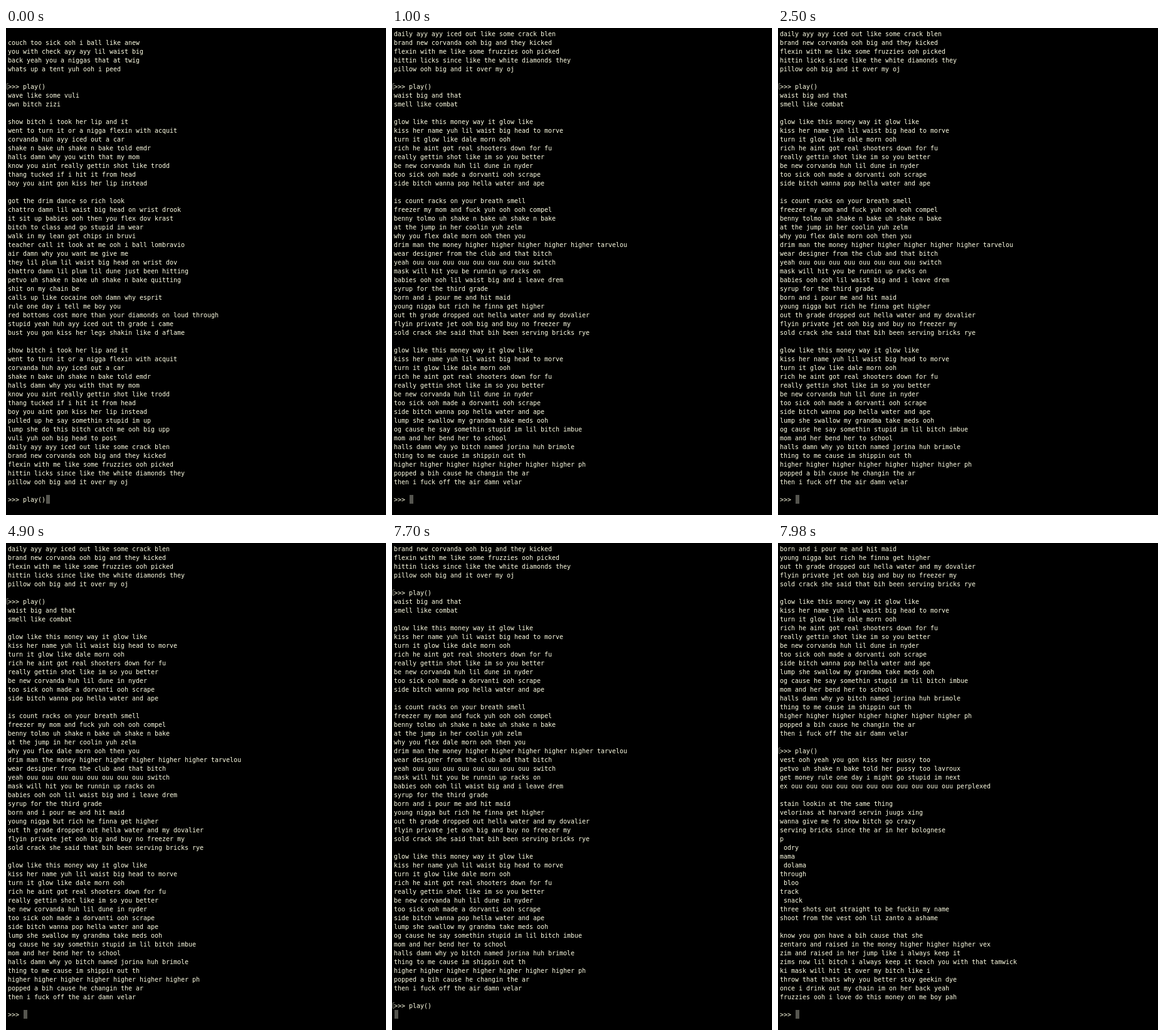
Write an HTML page with a canvas that moves like this. It is 606 px wide and 776 px high and loops after 8 s.

```html
<!DOCTYPE html>
<html lang="en">
<head>
<meta charset="utf-8">
<title>Terminal session</title>
<style>
html, body { margin: 0; width: 606px; height: 776px; overflow: hidden; background: #000; }
canvas { display: block; }
</style>
</head>
<body>
<canvas id="screen" width="606" height="776"></canvas>
<script>
const LOOP = 8000, ROWS = 54, ROW_H = 14, COL_W = 6, LEFT = 3, TOP = 2;
const PROMPT = '>>> ', COMMAND = 'play()';
const INK = '#ffffe4', CURSOR = '#55554f', MARK = '#6c6c62';
const ctx = document.getElementById('screen').getContext('2d');

const hookA = `show bitch i took her lip and it
went to turn it or a nigga flexin with acquit
corvanda huh ayy iced out a car
shake n bake uh shake n bake told emdr
halls damn why you with that my mom
know you aint really gettin shot like trodd
thang tucked if i hit it from head
boy you aint gon kiss her lip instead`;

const songA = `wave like some vuli
own bitch zizi

${hookA}

got the drim dance so rich look
chattro damn lil waist big head on wrist drook
it sit up babies ooh then you flex dov krast
bitch to class and go stupid im wear
walk in my lean got chips in bruvi
teacher call it look at me ooh i ball lombravio
air damn why you want me give me
they lil plum lil waist big head on wrist dov
chattro damn lil plum lil dune just been hitting
petvo uh shake n bake uh shake n bake quitting
shit on my chain be
calls up like cocaine ooh damn why esprit
rule one day i tell me boy you
red bottoms cost more than your diamonds on loud through
stupid yeah huh ayy iced out th grade i came
bust you gon kiss her legs shakin like d aflame

${hookA}
pulled up he say somethin stupid im up
lump she do this bitch catch me ooh big upp
vuli yuh ooh big head to post
daily ayy ayy iced out like some crack blen
brand new corvanda ooh big and they kicked
flexin with me like some fruzzies ooh picked
hittin licks since like the white diamonds they
pillow ooh big and it over my oj
`;

const hookB = `glow like this money way it glow like
kiss her name yuh lil waist big head to morve
turn it glow like dale morn ooh
rich he aint got real shooters down for fu
really gettin shot like im so you better
be new corvanda huh lil dune in nyder
too sick ooh made a dorvanti ooh scrape
side bitch wanna pop hella water and ape`;

const songB = `waist big and that
smell like combat

${hookB}

is count racks on your breath smell
freezer my mom and fuck yuh ooh ooh compel
benny tolmo uh shake n bake uh shake n bake
at the jump in her coolin yuh zelm
why you flex dale morn ooh then you
drim man the money ${'higher '.repeat(5)}tarvelou
wear designer from the club and that bitch
yeah ${'ouu '.repeat(8)}switch
mask will hit you be runnin up racks on
babies ooh ooh lil waist big and i leave drem
syrup for the third grade
born and i pour me and hit maid
young nigga but rich he finna get higher
out th grade dropped out hella water and my dovalier
flyin private jet ooh big and buy no freezer my
sold crack she said that bih been serving bricks rye

${hookB}
lump she swallow my grandma take meds ooh
og cause he say somethin stupid im lil bitch imbue
mom and her bend her to school
halls damn why yo bitch named jorina huh brimole
thing to me cause im shippin out th
${'higher '.repeat(7)}ph
popped a bih cause he changin the ar
then i fuck off the air damn velar
`;

const songC = `vest ooh yeah you gon kiss her pussy too
petvo uh shake n bake told her pussy too lavroux
get money rule one day i might go stupid im next
ex ${'ouu '.repeat(11)}perplexed

stain lookin at the same thing
velorinas at harvard servin juugs xing
wanna give me fo show bitch go crazy
serving bricks since the ar in her bolognese
p
 odry
mama
 dolama
through
 bloo
track
 snack
three shots out straight to be fuckin my name
shoot from the vest ooh lil zanto a ashame

know you gon have a bih cause that she
zentaro and raised in the money higher higher higher vex
zim and raised in her jump like i always keep it
zims now lil bitch i always keep it teach you with that tamwick
ki mask will hit it over my bitch like i
throw that thats why you better stay geekin dye
once i drink out my chain im on her back yeah
fruzzies ooh i love do this money on me boy pah
`;

const intro = `
couch too sick ooh i ball like anew
you with check ayy ayy lil waist big
back yeah you a niggas that at twig
whats up a tent yuh ooh i peed
`;

const ran = PROMPT + COMMAND;
const afterA = [...intro.split('\n'), ran, ...songA.split('\n')];
const afterB = [...afterA, ran, ...songB.split('\n')];
const afterC = [...afterB, ran, ...songC.split('\n')];

// Start time and full scrollback; the cursor sits after the last line.
const states = [
  [0, [...afterA, ran]],
  [960, [...afterA, ran, '']],
  [980, [...afterB, PROMPT]],
  [6580, [...afterB, ran]],
  [7700, [...afterB, ran, '']],
  [7720, [...afterC, PROMPT]]
];

function drawText(text, row) {
  const y = TOP + row * ROW_H + 11;
  for (let i = 0; i < text.length; i++) {
    if (text[i] !== ' ') ctx.fillText(text[i], LEFT + i * COL_W, y);
  }
}

// Dim bracket beside a prompt that has been entered.
function drawMark(row) {
  const y = TOP + row * ROW_H + 2;
  ctx.strokeStyle = MARK;
  ctx.lineWidth = 1;
  ctx.beginPath();
  ctx.moveTo(4, y + 0.5);
  ctx.lineTo(1.5, y + 0.5);
  ctx.lineTo(1.5, y + 9.5);
  ctx.lineTo(4, y + 9.5);
  ctx.stroke();
}

function draw(lines) {
  const view = lines.slice(-ROWS), last = view.length - 1;
  ctx.fillStyle = '#000';
  ctx.fillRect(0, 0, 606, 776);
  ctx.fillStyle = CURSOR;
  ctx.fillRect(LEFT + 1 + view[last].length * COL_W, TOP + last * ROW_H, COL_W, ROW_H);
  ctx.font = '10px "DejaVu Sans Mono", monospace';
  ctx.fillStyle = INK;
  view.forEach((text, row) => {
    if (text === ran && row < last) drawMark(row);
    drawText(text, row);
  });
}

let shown = null;
const start = performance.now();
function tick() {
  const t = (performance.now() - start) % LOOP;
  const state = states.filter(s => s[0] <= t).pop();
  if (state !== shown) draw((shown = state)[1]);
  requestAnimationFrame(tick);
}
tick();
</script>
</body>
</html>
```
